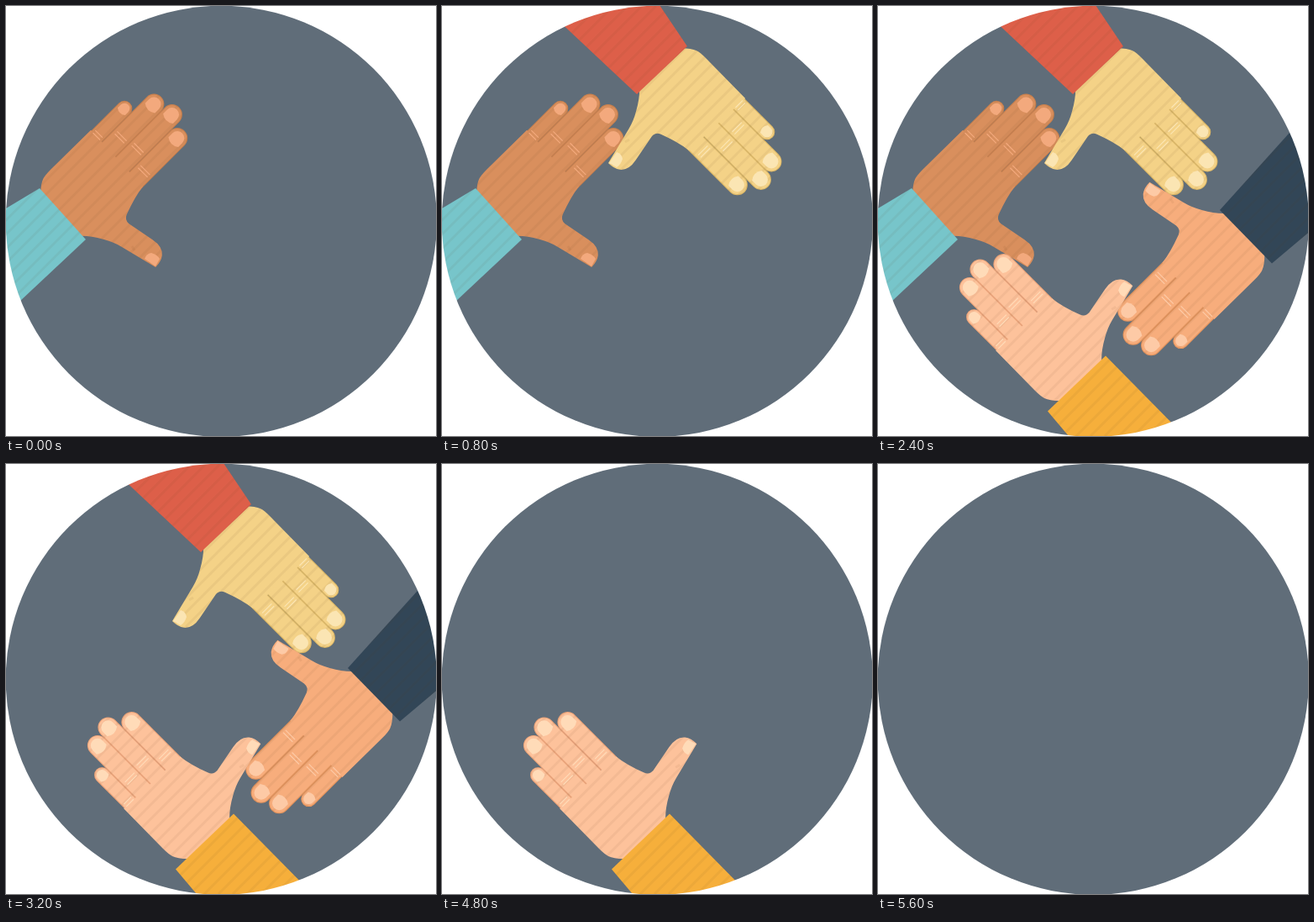
An HTML page with a canvas that plays this animation: 512x512 px, repeating every 6.4 s.

```html
<!DOCTYPE html>
<html lang="en">
<head>
<meta charset="utf-8">
<style>
  html, body { margin: 0; height: 100%; overflow: hidden; background: #fff; }
  canvas { display: block; clip-path: circle(256.6px at 256.3px 256.3px); }
</style>
</head>
<body>
<canvas id="stage" width="512" height="512"></canvas>
<script>
const SIZE = 512, STEP = 800, STEPS = 8, STAY = 4;
const ctx = document.getElementById('stage').getContext('2d');

// One entry per hand, each a quarter turn further round the circle.
const people = [
  { skin: '#d98f5d', shade: '#c8804e', nail: '#f3a97d', cloth: '#77c5ca', shift: [0, 0],
    sleeve: [[40, 217], [95, 278], [0, 367], [-40, 265]] },
  { skin: '#f4d287', shade: '#dfba68', nail: '#fbe5b3', cloth: '#dd5f49', shift: [0, 0],
    sleeve: [[292, 48], [232, 105], [119, -1], [257, -4]] },
  { skin: '#f7ad7c', shade: '#e59660', nail: '#fdcaa6', cloth: '#324657', shift: [1.5, 2.8],
    sleeve: [[469, 306.5], [407, 243], [517, 121], [560, 230]] },
  { skin: '#fdc29b', shade: '#efa67b', nail: '#ffdbb8', cloth: '#f6af3b', shift: [1.3, 2.3],
    sleeve: [[202, 482.5], [271, 416.5], [371, 518], [232, 518]] }
];

// Tip centre, radius and distance from tip to knuckle.
const fingers = [
  { x: 141, y: 122, r: 9.3, knuckle: 45 },
  { x: 176.2, y: 116.8, r: 12.2, knuckle: 56 },
  { x: 197.7, y: 129.3, r: 12.2, knuckle: 58 },
  { x: 204, y: 157.3, r: 12.2, knuckle: 56 }
];
const FINGER_LENGTH = 82;

const palm = new Path2D('M42 224C42 207 46 203 54 195L101 149L162 215' +
  'C154 225 148 237 143 248Q140 255 146 260L174 279Q186 287 185 297Q184 304 178 310' +
  'L138 286Q128 280 116 277Q102 273 90 273L60 270Z');
const thumbNail = new Path2D('M165 301Q167 295 173 294Q180 296 183 301L178 310Z');
const thumbCrease = new Path2D('M150 286L153 291');

function polygon(c, points) {
  c.beginPath();
  points.forEach(p => c.lineTo(...p));
  c.closePath();
  c.fill();
}

function inFinger(c, f, draw) {
  c.save();
  c.translate(f.x, f.y);
  c.rotate(Math.PI / 4);
  draw();
  c.restore();
}

function line(c, x1, y1, x2, y2, width, color) {
  c.lineWidth = width;
  c.strokeStyle = color;
  c.beginPath();
  c.moveTo(x1, y1);
  c.lineTo(x2, y2);
  c.stroke();
}

function drawStripes(c) {
  c.globalCompositeOperation = 'source-atop';
  for (let x = 0; x < 2 * SIZE; x += 17) line(c, x, 0, x - SIZE, SIZE, 3, 'rgba(90,50,20,.06)');
  c.globalCompositeOperation = 'source-over';
}

function drawNail(c, r) {
  const w = r * 0.68;
  c.beginPath();
  c.arc(0, 0, w, Math.PI, 0);
  c.lineTo(w, r * 0.55);
  c.quadraticCurveTo(0, r * 1.05, -w, r * 0.55);
  c.fill();
}

function makeHand(person, turn) {
  const sheet = document.createElement('canvas');
  sheet.width = sheet.height = SIZE;
  const c = sheet.getContext('2d');
  const posed = draw => {
    c.save();
    c.translate(250 + person.shift[0], 259 + person.shift[1]);
    c.rotate(turn * Math.PI / 2);
    c.translate(-250, -259);
    draw();
    c.restore();
  };

  posed(() => {
    c.lineCap = 'round';
    for (const f of fingers) inFinger(c, f, () => {
      line(c, 0, 0, 0, FINGER_LENGTH, 2 * f.r, person.shade);
      line(c, 0, 0, 0, FINGER_LENGTH, 2 * f.r - 2.2, person.skin);
    });
    c.fillStyle = c.strokeStyle = person.skin;
    c.lineWidth = 1.6;
    c.fill(palm);
    c.stroke(palm);
  });

  c.fillStyle = person.cloth;
  polygon(c, person.sleeve);
  drawStripes(c);

  posed(() => {
    c.fillStyle = person.nail;
    c.fill(thumbNail);
    c.lineCap = 'butt';
    for (const f of fingers) inFinger(c, f, () => {
      drawNail(c, f.r);
      const k = f.knuckle, half = f.r * 0.65;
      line(c, -half, k - 2, half, k - 2, 1.2, person.nail);
      line(c, -half, k + 2, half, k + 2, 1.2, person.nail);
    });
    c.stroke(thumbCrease);
  });
  return sheet;
}

const hands = people.map(makeHand);

function render() {
  const step = Math.floor(performance.now() / STEP) % STEPS;
  ctx.fillStyle = '#606d79';
  ctx.fillRect(0, 0, SIZE, SIZE);
  hands.forEach((hand, i) => {
    if (step >= i && step < i + STAY) ctx.drawImage(hand, 0, 0);
  });
  requestAnimationFrame(render);
}
render();
</script>
</body>
</html>
```
